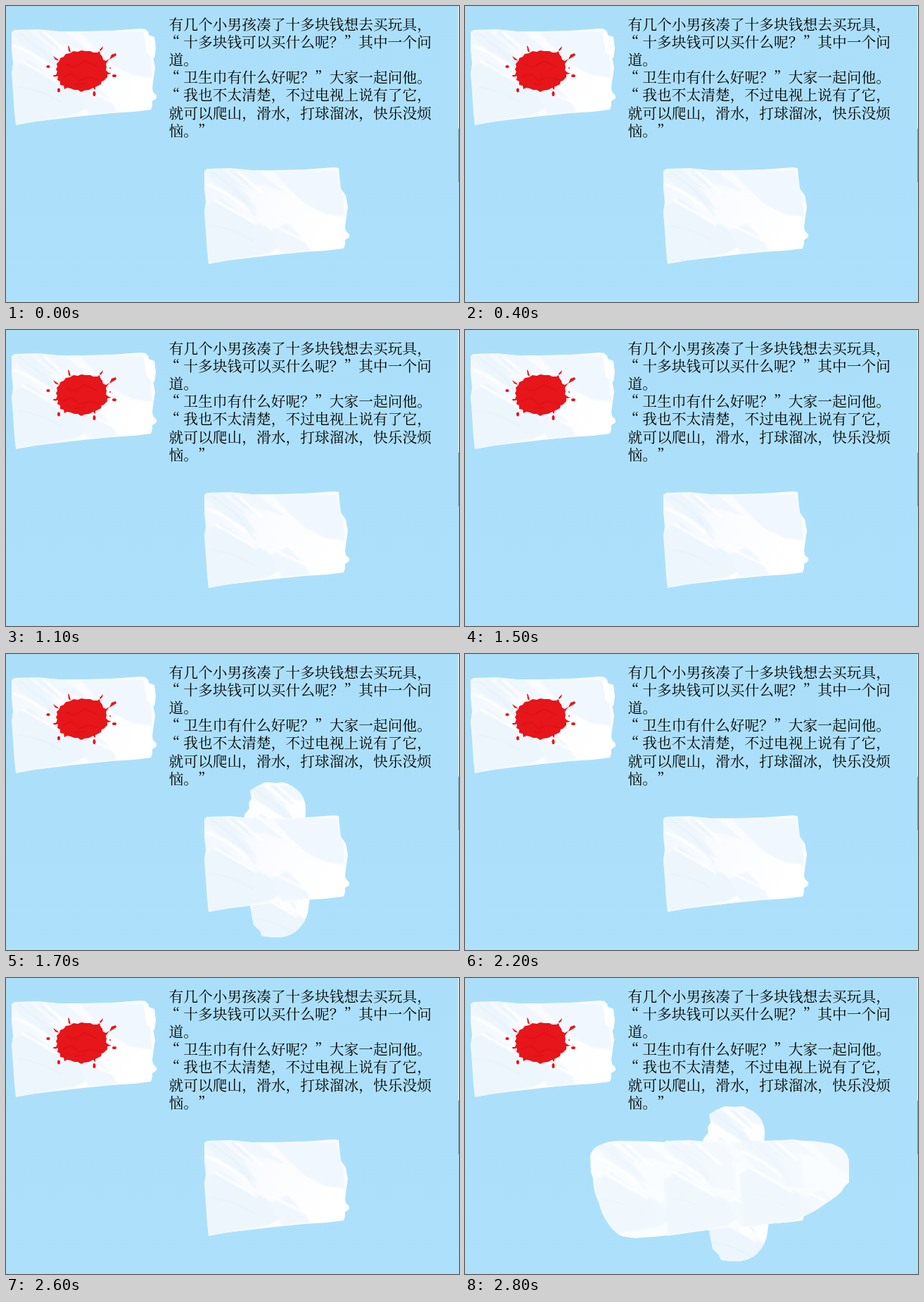
Animation of 644 by 420 pixels, one loop 3.8 s. Source, as an HTML page:

```html
<!DOCTYPE html>
<html lang="zh-CN">
<head>
<meta charset="utf-8">
<style>
  html, body { margin: 0; width: 100%; height: 100%; overflow: hidden; }
  svg { display: block; }
  text {
    font: 400 20.75px "Noto Serif CJK SC", "Noto Sans CJK SC", "Noto Sans CJK", serif;
    text-spacing-trim: space-all;
  }
</style>
</head>
<body>
<svg width="644" height="420" viewBox="0 0 644 420">
  <defs>
    <linearGradient id="sky" x2="0" y2="1">
      <stop stop-color="#abdff9"/><stop offset="1" stop-color="#ade1fb"/>
    </linearGradient>
    <linearGradient id="cloth" x2="1" y2=".3">
      <stop stop-color="#f1f8fe"/><stop offset=".5" stop-color="#fafcff"/><stop offset="1" stop-color="#fff"/>
    </linearGradient>
    <filter id="soft"><feGaussianBlur stdDeviation="1.3"/></filter>
    <path id="outline" d="M8 37L12 34 45 33 75 36 110 36 150 35 192 32 199 33 200 45 202 62 209 72 212 88 210 101 208 116 209 122 214 127 214 131 208 135 208 141 206 147 182 150 150 152 110 156 75 160 42 164 14 169 12 150 10 120 8 95 10 82 8 62Z"/>
    <path id="bodyOutline" d="M178 252Q181 241 192 237Q203 231 220 231L270 232 300 234 335 232 345 229 390 232 425 231 470 230 500 232 520 235Q533 239 539 245Q546 253 546 264L546 290Q540 294 536 302Q528 311 514 319Q500 330 488 335Q471 345 450 347L420 350 350 357 300 364 270 367 243 369Q228 368 220 365Q208 357 202 346Q194 334 190 318Q182 302 182 284L179 275Z"/>
    <path id="wingOutline" d="M338 238L339 228 346 219 345 212 349 205 347 194 356 188 369 182 384 183 395 182Q411 188 419 198Q427 210 426 222L425 238ZM346 349L348 363 352 384 361 393 364 400 378 402 391 402Q408 399 416 390Q429 376 430 361L432 345Z"/>
    <clipPath id="flagClip"><use href="#outline"/></clipPath>
    <clipPath id="bodyClip"><use href="#bodyOutline"/></clipPath>
    <clipPath id="wingClip"><use href="#wingOutline"/></clipPath>

    <g id="folds" filter="url(#soft)">
      <path fill="#edf6fd" d="M8 38L30 36 66 68 84 94 56 77 22 55ZM8 88L32 76 65 101 95 116 126 138 98 154 14 169Z"/>
      <path fill="#f1f7fe" d="M42 35L82 36 122 67 90 57 65 55ZM100 122L126 111 150 135 158 150 118 154ZM105 37L196 36 206 72 208 102 180 98 152 84 128 62Z"/>
      <path fill="none" stroke="#e3f0fa" stroke-width="1.5" d="M17 37L54 65 81 101M31 36L65 63M47 37L76 62M18 115Q50 118 78 137"/>
      <path fill="none" stroke="#fff" stroke-width="3" d="M10 56Q41 66 68 92M22 78L83 113M54 37L91 69M105 114L153 137"/>
    </g>
    <g id="flag">
      <use href="#outline" fill="url(#cloth)"/>
      <use href="#folds" clip-path="url(#flagClip)"/>
    </g>
  </defs>

  <rect width="644" height="420" fill="url(#sky)"/>
  <path d="M643.5 0V174" stroke="#eef8fd"/>
  <path d="M643.5 174V250" stroke="#789aaa"/>

  <use href="#flag"/>
  <path fill="#fff" d="M195 33L202 36 203 41 211 44 213 60 211 74 200 66Z"/>
  <g fill="#e6161b">
    <path d="M72 82L76 78 77 74 82 72 85 68 91 67 96 64 102 65 107 63 113 64 120 64 124 66 130 66 133 64 134 68 137 72 138 76 142 78 147 75 142 82 143 87 142 91 145 94 150 96 144 97 144 101 139 106 136 107 135 111 131 113 127 115 127 119 124 116 118 119 111 120 107 122 102 119 97 119 92 117 87 116 83 118 82 113 77 112 77 107 73 105 74 100 71 98 73 93 71 90 73 86Z"/>
    <path d="M67 71L73 75 76 78 70 76ZM88 56L90 58 92 66 89 64ZM133 62L138 57 137 61 134 64ZM147 76L150 69 156 67 157 70Z"/>
    <ellipse cx="60" cy="86" rx="2.7" ry="2"/>
    <ellipse cx="154" cy="99" rx="3" ry="2"/>
    <ellipse cx="125.5" cy="124.5" rx="2" ry="3.5"/>
    <ellipse cx="75" cy="119.5" rx="2" ry="3"/>
    <ellipse cx="70" cy="99" rx="3" ry="1.3"/>
    <circle cx="148" cy="88" r="1"/>
    <path d="M80 101L94 96 104 106 119 101 134 105M84 82L97 87 112 78 130 86M97 111L113 110" fill="none" stroke="#d20b10" stroke-width="1.5" opacity=".4"/>
  </g>

  <g id="story"></g>

  <g id="wings">
    <use href="#wingOutline" fill="#fcfeff"/>
    <g clip-path="url(#wingClip)">
      <use href="#folds" x="332" y="151"/>
      <use href="#folds" x="331" y="260"/>
    </g>
  </g>
  <use href="#flag" x="274" y="197"/>
  <g id="body">
    <use href="#bodyOutline" fill="#fafdff"/>
    <g clip-path="url(#bodyClip)" opacity=".7">
      <use href="#folds" x="176" y="199"/>
      <use href="#folds" x="274" y="197"/>
      <use href="#folds" x="382" y="190"/>
    </g>
  </g>
</svg>
<script>
  const lines = [
    "有几个小男孩凑了十多块钱想去买玩具，",
    "“十多块钱可以买什么呢？”其中一个问",
    "道。",
    "“卫生巾有什么好呢？”大家一起问他。",
    "“我也不太清楚，不过电视上说有了它，",
    "就可以爬山，滑水，打球溜冰，快乐没烦",
    "恼。”"
  ];
  const byId = id => document.getElementById(id);
  // Opening quotes sit further left in their cell.
  const setQuote = line => line.replace(/^“(.)/, '<tspan dx="-5">“</tspan><tspan dx="5">$1</tspan>');
  byId("story").innerHTML = lines.map((line, i) =>
    `<text x="231.5" y="${34 + i * 25.1}">${setQuote(line)}</text>`).join("");

  const LOOP = 3800;
  const shown = {
    body: [[200, 400], [600, 1100], [2400, 2600], [2800, LOOP]],
    wings: [[1300, 1500], [1700, 2200], [2400, 2600], [2800, LOOP]]
  };
  const start = performance.now();

  function draw(now) {
    const t = Math.max(0, now - start) % LOOP;
    for (const id in shown) {
      const on = shown[id].some(([from, to]) => t >= from && t < to);
      byId(id).setAttribute("visibility", on ? "visible" : "hidden");
    }
    requestAnimationFrame(draw);
  }
  draw(start);
</script>
</body>
</html>
```
